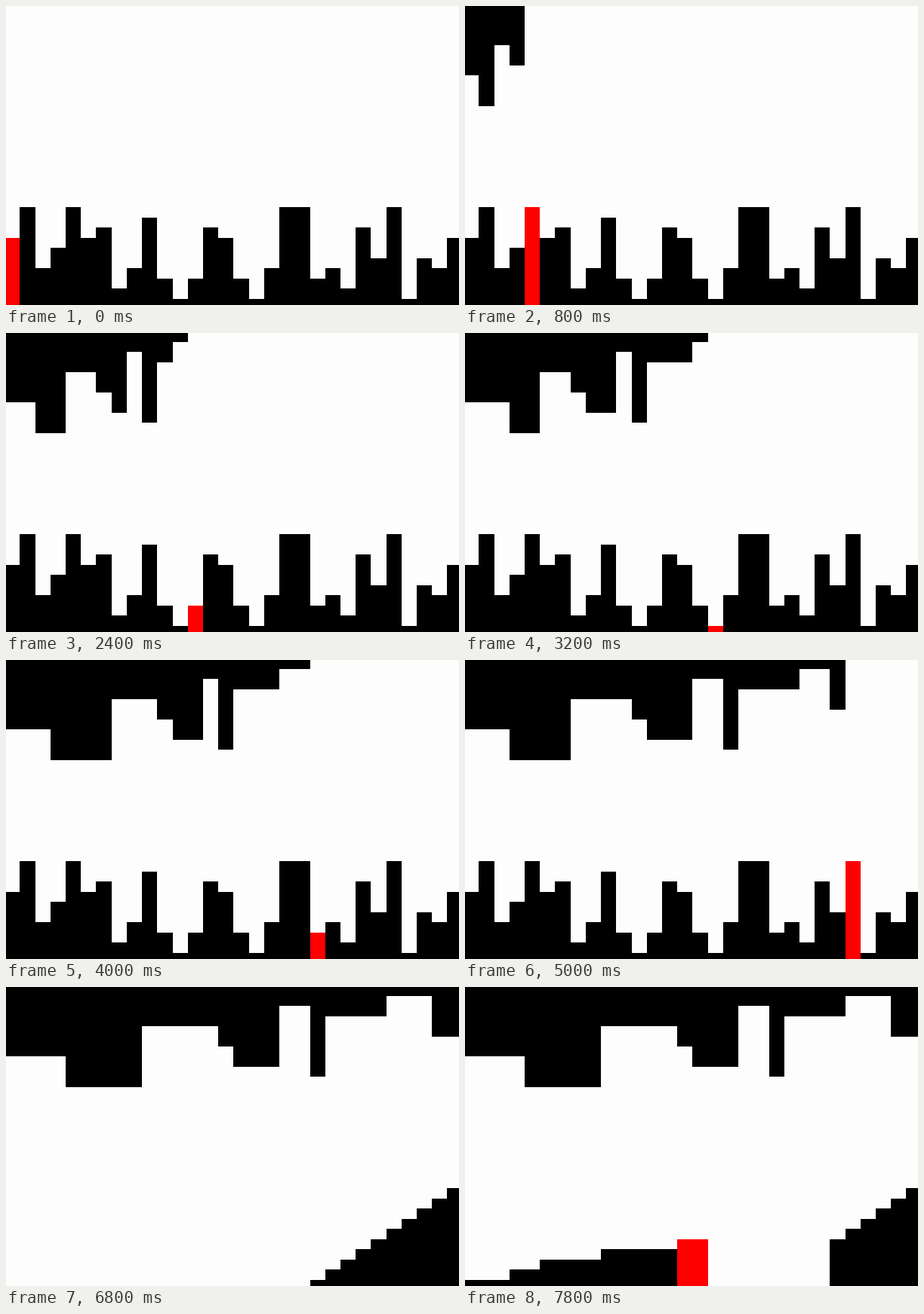
Recreate the animation shown at these times as an HTML page with a canvas. Size 600 by 397 pixels, loop 8 s.

```html
<!DOCTYPE html>
<html lang="en">
<head>
<meta charset="utf-8">
<title>Bucket sort</title>
<style>
html, body { margin: 0; width: 100%; height: 100%; overflow: hidden; background: #fefdfe; }
canvas { display: block; }
</style>
</head>
<body>
<canvas id="stage" width="600" height="397"></canvas>
<script>
const ctx = document.getElementById('stage').getContext('2d');
const W = 600, H = 397, STEP = 200, LOOP = 8000;
const WHITE = '#fefdfe', BLACK = '#000', RED = '#fe0000';

const values = [...'693596713820276203992317490436'].map(Number);
const N = values.length;
const keys = [...new Set(values)];
const sorted = [...keys].sort((a, b) => a - b);

const edge = i => Math.round(20.215 * i - 1.79);

function fillColumn(i, y, h, color) {
  ctx.fillStyle = color;
  ctx.fillRect(edge(i), y, edge(i + 1) - edge(i), h);
}

function rise(i, value, color) {
  const y = Math.floor(389 - 13.47 * value);
  fillColumn(i, y, H - y, color);
}

function hang(i, value) {
  fillColumn(i, 0, Math.round(11.7 + 13.45 * value), BLACK);
}

const riseAll = (list, start, color) => list.forEach((v, i) => rise(start + i, v, color));

// Group the first `count` values, groups in order of first appearance.
function grouped(count, order) {
  const seen = values.slice(0, count);
  return order.flatMap(k => seen.filter(v => v === k));
}

function drawKeys(phase) {
  if (phase === 0) riseAll(values, 0, BLACK);
  if (phase < 2) riseAll(keys, 0, RED);
  else if (phase === 2) riseAll(sorted, 0, RED);
  else riseAll(sorted, N - sorted.length, phase === 3 ? RED : BLACK);
}

function drawOutput(active) {
  const placed = grouped(N, sorted.slice(0, active + 1));
  placed.forEach((v, i) => rise(i, v, v === sorted[active] ? RED : BLACK));
  riseAll(sorted.slice(active), N - sorted.length + active, BLACK);
}

function draw(step) {
  ctx.fillStyle = WHITE;
  ctx.fillRect(0, 0, W, H);
  grouped(Math.min(step, N), keys).forEach((v, i) => hang(i, v));
  if (step < N) {
    values.forEach((v, i) => rise(i, v, i === step ? RED : BLACK));
  } else if (step < N + 5) {
    drawKeys(step - N);
  } else {
    drawOutput(step - N - 5);
  }
}

const start = performance.now();
function tick() {
  const t = (performance.now() - start) % LOOP;
  draw(Math.floor(t / STEP));
  requestAnimationFrame(tick);
}
tick();
</script>
</body>
</html>
```
